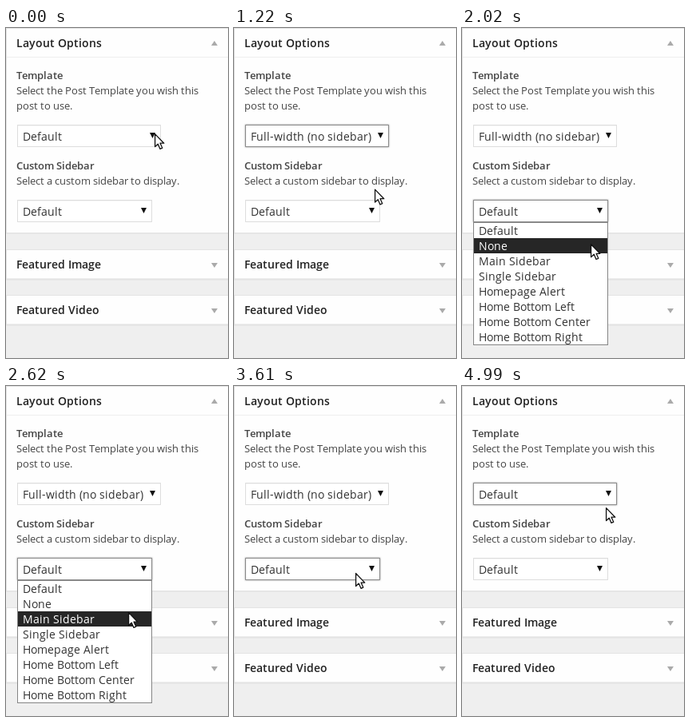
Animation, 278 px wide and 413 px high, one loop 5.03 s. Source, as an HTML page:

```html
<!DOCTYPE html>
<html lang="en">
<head>
<meta charset="utf-8">
<title>Layout options</title>
<style>
html, body { margin: 0; width: 100%; height: 100%; overflow: hidden; background: #efefef; }
svg { display: block; width: 278px; height: 413px; cursor: default; }
text { font-family: "Open Sans", "Noto Sans", sans-serif; white-space: pre; }
.ring { filter: drop-shadow(0 0 1px rgba(0,0,0,.45)); }
</style>
</head>
<body>
<svg id="stage" viewBox="0 0 278 413" xmlns="http://www.w3.org/2000/svg"></svg>
<script>
const LOOP = 5030;
const stage = document.getElementById('stage');
const ruler = document.createElement('canvas').getContext('2d');

function add(parent, tag, attrs = {}) {
  const el = document.createElementNS(stage.namespaceURI, tag);
  for (const k in attrs) el.setAttribute(k, attrs[k]);
  parent.append(el);
  return el;
}

const rect = (parent, x, y, width, height, fill, more) =>
  add(parent, 'rect', { x, y, width, height, fill, ...more });

// one-pixel frame, aligned to the pixel grid
const frame = (parent, x, y, w, h, fill, stroke, more) =>
  rect(parent, x + .5, y + .5, w - 1, h - 1, fill, { stroke, ...more });

// text whose letters advance by whole pixels
function write(parent, x, y, str, size, fill, weight = 400) {
  ruler.font = `${weight} ${size}px "Open Sans", "Noto Sans", sans-serif`;
  let pen = x;
  const xs = [...str].map(c => {
    const at = pen;
    pen += Math.round(ruler.measureText(c).width);
    return at;
  });
  const el = add(parent, 'text', {
    x: xs.join(' '), y, fill, 'font-size': size, 'font-weight': weight
  });
  el.textContent = str;
  return el;
}

const show = (el, on) => el.setAttribute('visibility', on ? 'visible' : 'hidden');

function panel(y, height, title, arrow) {
  rect(stage, 0, y + height, 278, 1, '#e8e8e8');
  frame(stage, 0, y, 280, height, '#fefefe', '#e3e3e3');
  rect(stage, 1, y + 36, 277, 1, '#eee');
  write(stage, 13, y + 24, title, 14, '#222', 600);
  add(stage, 'path', { d: arrow, fill: '#aaa' });
}

function dropdown(top, width, options) {
  frame(stage, 14, top, width, 28, '#fff', '#ddd');
  rect(stage, 15, top + 1, width - 2, 1, '#f5f5f5');
  const ring = frame(stage, 14, top, width, 28, '#fff', '#8c8c8c', { class: 'ring' });
  add(stage, 'path', { d: `M${width} ${top + 10}h7l-3.5 7z`, fill: '#111' });
  const values = options.map(name => write(stage, 21, top + 20, name, 14, '#333'));

  const list = add(stage, 'g');
  frame(list, 14, top + 28, width, options.length * 19 + 2, '#fff', '#858585');
  const bar = rect(list, 15, 0, width - 2, 19, '#262626');
  const rows = options.map((name, i) => write(list, 21, top + 44 + i * 19, name, 14, '#333'));

  return (picked, focus, open, y) => {
    values.forEach((v, i) => show(v, i === picked));
    show(ring, focus);
    list.setAttribute('display', open ? 'inline' : 'none');
    // before the pointer reaches the list, the current value is lit
    const row = Math.floor((y - top - 29) / 19);
    const lit = row < 0 ? picked : Math.min(row, options.length - 1);
    bar.setAttribute('y', top + 29 + lit * 19);
    rows.forEach((r, i) => r.setAttribute('fill', i === lit ? '#fff' : '#333'));
  };
}

panel(0, 257, 'Layout Options', 'M257 22h8l-4-6z');
panel(277, 38, 'Featured Image', 'M257 294h8l-4 6z');
panel(334, 38, 'Featured Video', 'M257 351h8l-4 6z');
write(stage, 13, 64, 'Template', 13, '#444', 600);
write(stage, 13, 83, 'Select the Post Template you wish this', 13, '#444');
write(stage, 13, 102, 'post to use.', 13, '#444');
write(stage, 13, 177, 'Custom Sidebar', 13, '#444', 600);
write(stage, 13, 196, 'Select a custom sidebar to display.', 13, '#444');

const sidebar = dropdown(215, 169, ['Default', 'None', 'Main Sidebar', 'Single Sidebar',
  'Homepage Alert', 'Home Bottom Left', 'Home Bottom Center', 'Home Bottom Right']);
const template = dropdown(121, 180, ['Default', 'Full-width (no sidebar)']);

const pointer = add(stage, 'path', {
  d: 'M.6 .6V16.6L4.3 13.2 7 19.4 9.8 18.2 7.1 12.2H11.8Z',
  fill: '#fff', stroke: '#111', 'stroke-width': 1.3, 'stroke-linejoin': 'round'
});

// time, x, y of the pointer tip
const path = [
  [0, 186, 132], [240, 184, 137], [440, 181, 156], [700, 177, 175], [820, 176, 177],
  [1020, 176, 177], [1220, 176, 201.5], [1480, 172, 226], [1660, 169, 230], [2020, 161, 270],
  [2320, 155, 308], [2620, 153, 283], [3100, 150, 252], [3450, 150, 252], [3610, 152, 234],
  [3970, 181, 138], [4210, 182, 142], [4530, 178, 160], [4830, 178, 160], [4990, 180, 152],
  [LOOP, 180, 152]
];

function place(t) {
  const i = path.findIndex(p => p[0] > t);
  const [a, b] = [path[i - 1], path[i]];
  const u = (t - a[0]) / (b[0] - a[0]);
  const k = u * u * (3 - 2 * u) * .5 + u * .5;
  return [a[1] + (b[1] - a[1]) * k, a[2] + (b[2] - a[2]) * k];
}

const within = (t, from, to) => t >= from && t < to;

function draw(now) {
  const t = now % LOOP;
  const [x, y] = place(t);
  pointer.setAttribute('transform', `translate(${x.toFixed(1)} ${y.toFixed(1)})`);
  template(within(t, 1020, 4830) ? 1 : 0, within(t, 240, 1660) || t >= 4050,
    within(t, 240, 1020) || within(t, 4050, 4830), y);
  sidebar(0, within(t, 1660, 4050), within(t, 1660, 3450), y);
}

const start = performance.now();
function tick() {
  draw(performance.now() - start);
  requestAnimationFrame(tick);
}
draw(0);
requestAnimationFrame(tick);
</script>
</body>
</html>
```
